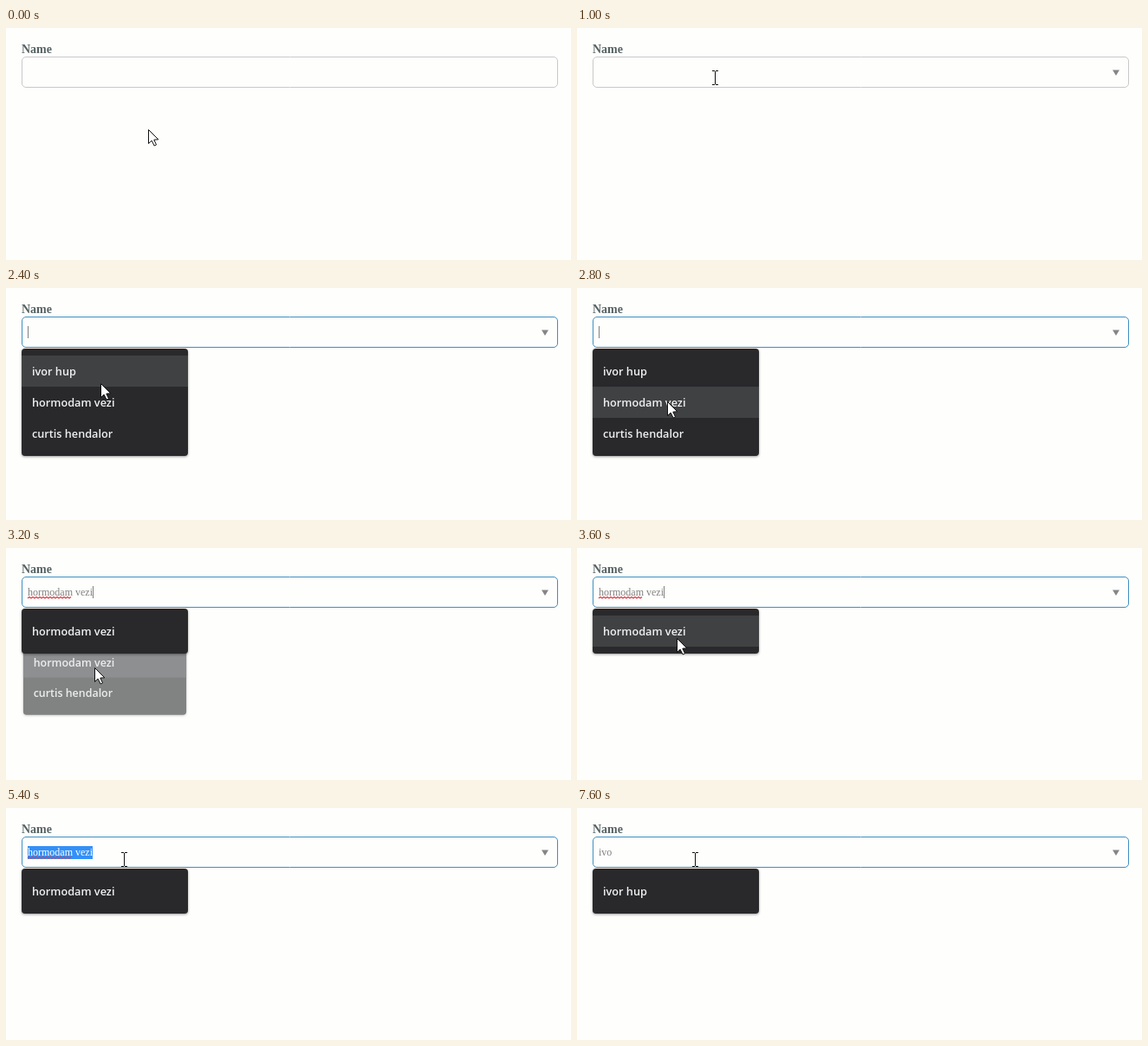
An HTML page with a canvas for the animation above (8000 ms loop, 652x268 px).

```html
<!DOCTYPE html>
<html lang="en">
<head>
<meta charset="utf-8">
<title>Name field with suggestions</title>
<style>
  html, body { margin: 0; width: 100%; height: 100%; overflow: hidden; background: #fefefd; }
  canvas { display: block; }
</style>
</head>
<body>
<canvas id="stage" width="652" height="268"></canvas>
<script>
const ctx = document.getElementById('stage').getContext('2d');
const LOOP = 8000, STEP = 200, BLINK = 500;
const NAMES = ['ivor hup', 'hormodam vezi', 'curtis hendalor'];
const PICKED = NAMES[1];
const SERIF = '"Liberation Serif", "Times New Roman", serif';
const SANS = '"Open Sans", "Noto Sans", sans-serif';
const FIELD = { x: 18, y: 33, w: 619, h: 36, textX: 25 };
const MENU = { x: 18, y: 70, w: 192, pad: 8, row: 36 };
const OPEN = { back: '#29292c', active: '#3f4143', text: '#f0f1f2', shadow: 'rgba(0,0,0,.4)' };
const FADED = { back: '#818383', active: '#8d8f91', text: '#ededed', shadow: 'rgba(0,0,0,.2)' };

// Pointer stops; it eases from each one to the next
const STOPS = [
  { at: 0, x: 164, y: 117 },
  { at: 1000, x: 159, y: 57 },
  { at: 1400, x: 159, y: 57 },
  { at: 2400, x: 109, y: 110 },
  { at: 3000, x: 102, y: 138 },
  { at: 3200, x: 102, y: 138 },
  { at: 3600, x: 115, y: 104 },
  { at: 4800, x: 136, y: 59 }
];

// Clicks in the field, the choice from the menu, and the typing
const PICK_TIME = 3200;
const CLICKS = { open: 1400, caret: 4800, word: 5200, all: 5400 };
const KEY_TIMES = [6400, 6800, 7000];

const passed = (times, t) => times.filter(at => at <= t);

function fieldState(t) {
  const typed = passed(KEY_TIMES, t).length;
  const focus = t >= CLICKS.open;
  const picked = t >= PICK_TIME;
  const text = typed ? NAMES[0].slice(0, typed) : picked ? PICKED : '';
  const items = !focus ? [] : NAMES.filter(name => name.startsWith(text));
  const selecting = t >= CLICKS.word && !typed;
  const selectFrom = t >= CLICKS.all ? 0 : text.indexOf(' ') + 1;
  const lastInput = Math.max(0, ...passed([...Object.values(CLICKS), PICK_TIME, ...KEY_TIMES], t));
  const caretOn = focus && !selecting && (t - lastInput) % (2 * BLINK) < BLINK;
  return { text, items, focus, selecting, selectFrom, caretOn };
}

function pointerAt(t) {
  const i = STOPS.findLastIndex(stop => stop.at <= t);
  const from = STOPS[i], to = STOPS[i + 1] || from;
  const p = (t - from.at) / (to.at - from.at || 1);
  const ease = Math.min(1, p) ** 2 * (3 - 2 * Math.min(1, p));
  const mix = axis => Math.round(from[axis] + (to[axis] - from[axis]) * ease);
  return { x: mix('x'), y: mix('y') };
}

function roundRect(x, y, w, h, r) {
  ctx.beginPath();
  ctx.roundRect(x, y, w, h, r);
}

function label(text, x, y, font, color) {
  ctx.font = font;
  ctx.fillStyle = color;
  ctx.fillText(text, x, y);
}

function squiggle(x, width) {
  ctx.beginPath();
  for (let i = 0; i <= width; i += 2) ctx.lineTo(x + i, i % 4 ? 56.5 : 58);
  ctx.strokeStyle = '#e23a44';
  ctx.lineWidth = 1.2;
  ctx.stroke();
}

function drawField(state, hovered) {
  roundRect(FIELD.x + .5, FIELD.y + .5, FIELD.w - 1, FIELD.h - 1, 4.5);
  ctx.strokeStyle = state.focus ? '#3f8fc0' : '#c9c9c9';
  ctx.lineWidth = 1;
  ctx.stroke();

  if (state.focus || hovered) {
    ctx.fillStyle = '#858585';
    ctx.fill(new Path2D('M618 48.5h8l-4 6.5z'));
  }

  const font = `12px ${SERIF}`, x = FIELD.textX;
  label(state.text, x, 55, font, '#808080');
  const width = s => ctx.measureText(s).width;
  const end = x + width(state.text);

  if (state.selecting) {
    const start = x + width(state.text.slice(0, state.selectFrom));
    ctx.fillStyle = '#3390f8';
    ctx.fillRect(start, 44, end - start, 15);
    label(state.text.slice(state.selectFrom), start, 55, font, '#ffffff');
  }
  if (state.text === PICKED) squiggle(x, width(PICKED.split(' ')[0]));
  if (state.caretOn) {
    ctx.fillStyle = '#808080';
    ctx.fillRect(Math.round(end), 44, 1, 14);
  }
}

function drawMenu(items, active, colors) {
  if (!items.length) return;
  const { x, y, w, pad, row } = MENU;
  ctx.save();
  ctx.shadowColor = colors.shadow;
  ctx.shadowBlur = 3;
  ctx.shadowOffsetY = 1;
  roundRect(x, y, w, items.length * row + 2 * pad, 4);
  ctx.fillStyle = colors.back;
  ctx.fill();
  ctx.restore();
  items.forEach((item, i) => {
    const top = y + pad + i * row;
    if (i === active) {
      ctx.fillStyle = colors.active;
      ctx.fillRect(x, top, w, row);
    }
    label(item, x + 12, top + 23, `600 12.7px ${SANS}`, colors.text);
  });
}

// The full menu shrinks slightly about its middle as it fades
function drawClosingMenu() {
  const cx = MENU.x + MENU.w / 2, cy = MENU.y + 62;
  ctx.save();
  ctx.translate(cx, cy);
  ctx.scale(.98, .98);
  ctx.translate(-cx, -cy);
  drawMenu(NAMES, NAMES.indexOf(PICKED), FADED);
  ctx.restore();
}

function drawArrow(x, y) {
  const shape = new Path2D('M0 0V16L3.6 12.6L6.6 18.5L9 17.4L6.3 11.6L11.3 11.3Z');
  ctx.save();
  ctx.translate(x + .5, y + .5);
  ctx.fillStyle = '#fff';
  ctx.fill(shape);
  ctx.strokeStyle = '#111';
  ctx.lineWidth = 1;
  ctx.stroke(shape);
  ctx.restore();
}

function drawBeam(x, y) {
  ctx.fillStyle = '#111';
  ctx.fillRect(x, y - 7, 1, 15);
  for (const dy of [-8, 8]) {
    ctx.fillRect(x - 3, y + dy, 3, 1);
    ctx.fillRect(x + 1, y + dy, 3, 1);
  }
}

function draw(t) {
  const state = fieldState(t);
  const { x, y } = pointerAt(t);
  const overField = y >= FIELD.y && y < FIELD.y + FIELD.h;
  const hoverRow = Math.floor((y - MENU.y - MENU.pad) / MENU.row);

  ctx.fillStyle = '#fefefd';
  ctx.fillRect(0, 0, 652, 268);
  label('Name', 18, 29, `bold 14px ${SERIF}`, '#566262');
  drawField(state, overField);
  if (t >= PICK_TIME && t < PICK_TIME + STEP) drawClosingMenu();
  drawMenu(state.items, hoverRow, OPEN);
  (overField ? drawBeam : drawArrow)(x, y);
}

function tick() {
  const t = performance.now() % LOOP;
  draw(Math.floor(t / STEP) * STEP);
  requestAnimationFrame(tick);
}
tick();
</script>
</body>
</html>
```
